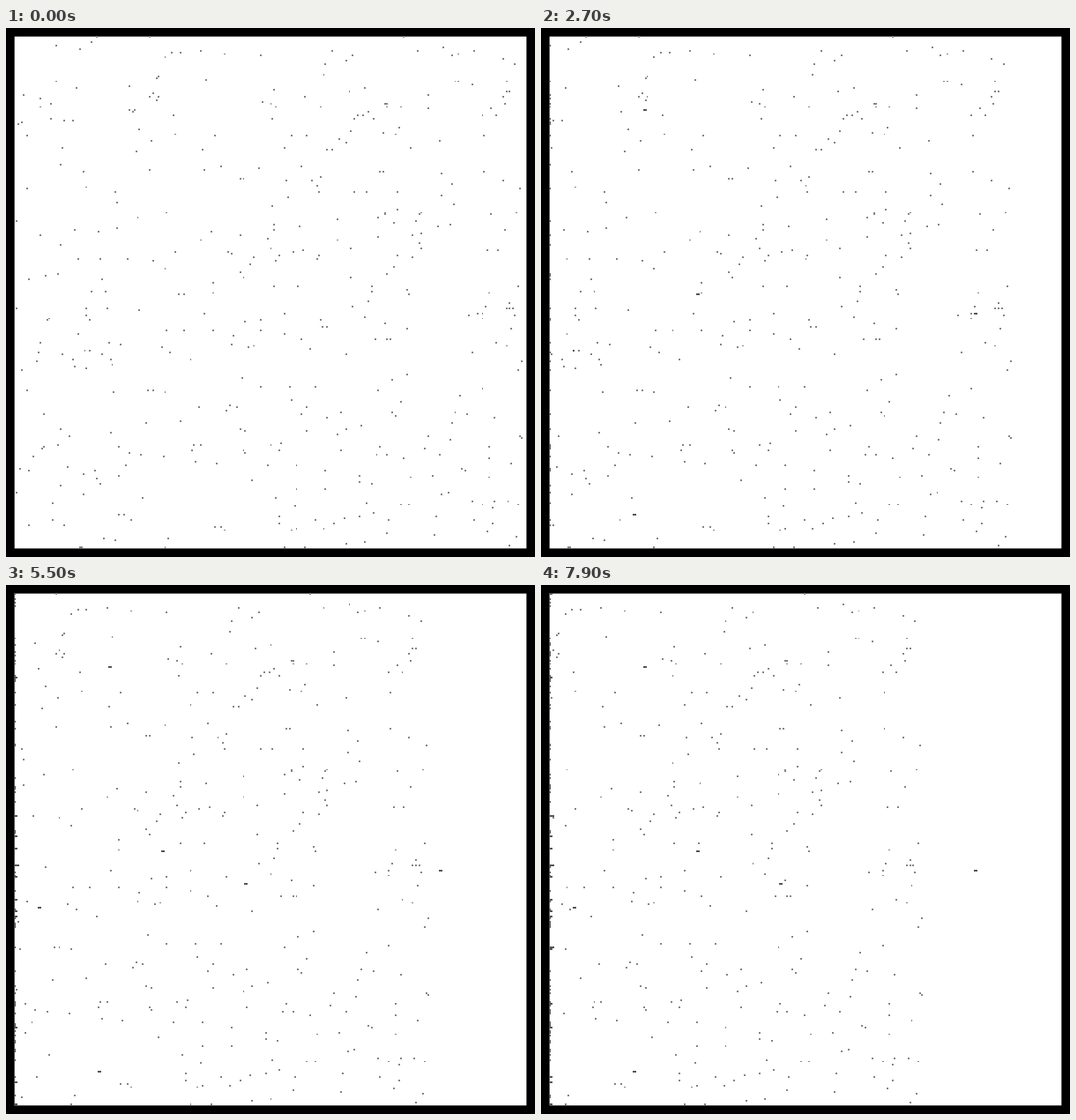
An HTML page with a canvas for the animation above (8 s loop, 600 by 600 pixels).

```html
<!DOCTYPE html>
<html lang="en">
<head>
<meta charset="utf-8">
<title>Drifting dots</title>
<style>
html, body { margin: 0; width: 100%; height: 100%; overflow: hidden; background: #000; }
canvas { display: block; width: 600px; height: 600px; }
</style>
</head>
<body>
<canvas id="stage" width="600" height="600"></canvas>
<script>
const LOOP = 8000, STEP = 100;
const SIZE = 600, GRID = 300, CELL = 60 / 31, EDGE = 300 / 31;
const COUNT = 425;
const MOVING = "#858585", RESTING = "#555";
const ctx = document.getElementById("stage").getContext("2d");

const toCell = px => Math.floor((px - EDGE) / CELL);
const toPx = cell => Math.floor(EDGE + cell * CELL + 1e-6);

// Places where two dots in a row come to rest inside the field
const pairs = [
  { x: 119, y: 94, step: 12 },
  { x: 179, y: 302, step: 10 },
  { x: 106, y: 552, step: 12 },
  { x: 493, y: 325, step: 22 },
  { x: 38, y: 366, step: 27 },
  { x: 272, y: 339, step: 45 }
];

let seed = 4711;
function random() {
  seed = (seed + 0x6D2B79F5) | 0;
  let n = Math.imul(seed ^ (seed >>> 15), 1 | seed);
  n = (n + Math.imul(n ^ (n >>> 7), 61 | n)) ^ n;
  return ((n ^ (n >>> 14)) >>> 0) / 4294967296;
}

function makeDots() {
  const dots = Array.from({ length: COUNT }, () => ({
    x: 1 + Math.floor(random() * (GRID - 3)),
    y: Math.floor(random() * GRID)
  }));

  // Each row piles up against the left wall
  const piled = new Array(GRID).fill(0);
  dots.sort((a, b) => a.x - b.x);
  for (const dot of dots) dot.stop = piled[dot.y]++;

  for (const { x, y, step } of pairs) {
    const stop = toCell(x - 1), row = toCell(y);
    dots.push({ x: stop + step, y: row, stop });
    dots.push({ x: stop + step + 3, y: row, stop: stop + 1 });
  }
  return dots;
}

const dots = makeDots();

function draw(step) {
  ctx.fillStyle = "#000";
  ctx.fillRect(0, 0, SIZE, SIZE);
  ctx.fillStyle = "#fff";
  ctx.fillRect(EDGE, EDGE, SIZE - 2 * EDGE, SIZE - 2 * EDGE);
  for (const dot of dots) {
    const col = Math.max(dot.stop, dot.x - step);
    const x = toPx(col), y = toPx(dot.y);
    ctx.fillStyle = col === dot.stop ? RESTING : MOVING;
    ctx.fillRect(x, y, toPx(col + 1) - x, toPx(dot.y + 1) - y);
  }
}

const start = performance.now();
function tick() {
  const time = (performance.now() - start) % LOOP;
  draw(Math.floor(time / STEP));
  requestAnimationFrame(tick);
}
tick();
</script>
</body>
</html>
```
